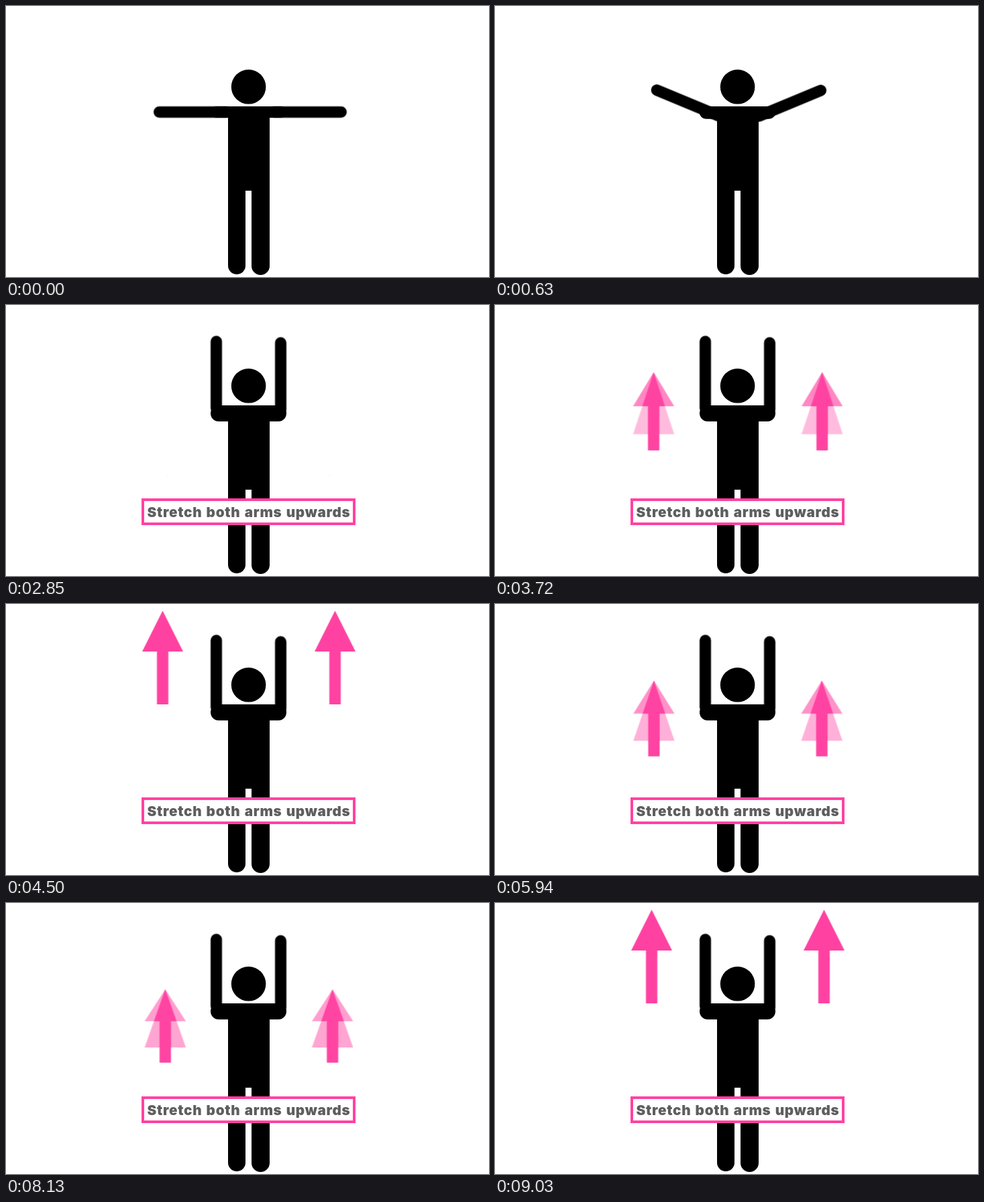
Write an HTML page that moves like this. It is 720 by 405 pixels and loops after 9.48 s.

```html
<!DOCTYPE html>
<html lang="en">
<head>
<meta charset="utf-8">
<title>Arm stretch</title>
<style>
  html, body { margin: 0; width: 100%; height: 100%; overflow: hidden; background: #fff; }
  svg { display: block; width: 100%; height: 100%; }

  .moving { animation: 9480ms ease-in-out infinite; }
  .arm { animation-name: lift; }
  .shoulders { animation-name: thicken; }
  .caption { animation-name: appear; }
  .arrow, .short, .long { animation-name: rise; }

  .arm.left {
    --from: translate(278.5px, 158.5px) rotate(0deg);
    --to: translate(313.5px, 104.5px) rotate(90deg);
  }
  .arm.right {
    --from: translate(449.5px, 158.5px) rotate(0deg);
    --to: translate(409.5px, 106.5px) rotate(-90deg);
  }

  .arrow { --fade-from: 1; --fade-to: 1; isolation: isolate; }
  .arrow.left { --from: translate(241.5px, 258px); --to: translate(233.5px, 10px); }
  .arrow.right { --from: translate(482.5px, 258px); --to: translate(490.5px, 10px); }

  /* Both shapes share one growing box; their opacities add up to 1. */
  .short, .long { mix-blend-mode: plus-lighter; }
  .short { --from: scale(1, 1); --to: scale(.984, 1.818); --fade-from: 1; --fade-to: 0; }
  .long { --from: scale(1.016, .55); --to: scale(1, 1); --fade-from: 0; --fade-to: 1; }

  @keyframes lift {
    0%, .1% { transform: var(--from); }
    18.99%, 100% { transform: var(--to); }
  }
  @keyframes thicken {
    0%, .1% { height: 17px; rx: 8.5px; ry: 8.5px; }
    18.99%, 100% { height: 24px; rx: 12px; ry: 12px; }
  }
  @keyframes appear {
    0%, 20.4% { opacity: 0; }
    28.48%, 100% { opacity: 1; }
  }
  @keyframes rise {
    0%, 28.48%, 52.53%, 76.264% { transform: var(--from); opacity: var(--fade-from); }
    47.046%, 52.52%, 71.097%, 76.255%, 94.831%, 100% { transform: var(--to); opacity: var(--fade-to); }
  }

  text {
    font: 900 20.7px Inter, "Arial Black", sans-serif;
    letter-spacing: .7px;
    word-spacing: 1.4px;
    text-anchor: middle;
    fill: #5e5e5e;
  }
</style>
</head>
<body>
<svg viewBox="0 0 720 405">
  <defs>
    <clipPath id="above"><rect width="720" height="255"/></clipPath>
    <rect id="forearm" x="-58.5" y="-8.5" width="117" height="17" rx="8.5"/>
    <path id="shortArrow" d="M0 0L31 61H8.5V77H-8.5V61H-31Z"/>
    <path id="longArrow" d="M0 0L30.5 61H8.5V140H-8.5V61H-30.5Z"/>
  </defs>

  <circle cx="361.6" cy="120.8" r="25.8"/>
  <path d="M331 150H393V388.5a13.5 13.5 0 0 1 -27 0V276H357V388a13 13 0 0 1 -26 0Z"/>
  <rect class="moving shoulders" x="305" y="150" width="113" height="17" rx="8.5"/>
  <use class="moving arm left" href="#forearm"/>
  <use class="moving arm right" href="#forearm"/>

  <g clip-path="url(#above)" fill="#ff42a1">
    <g class="moving arrow left">
      <use class="moving short" href="#shortArrow"/>
      <use class="moving long" href="#longArrow"/>
    </g>
    <g class="moving arrow right">
      <use class="moving short" href="#shortArrow"/>
      <use class="moving long" href="#longArrow"/>
    </g>
  </g>

  <g class="moving caption">
    <rect x="204" y="291" width="315" height="36" fill="#fff" stroke="#ff42a1" stroke-width="4"/>
    <text x="362" y="317">Stretch both arms upwards</text>
  </g>
</svg>
</body>
</html>
```
